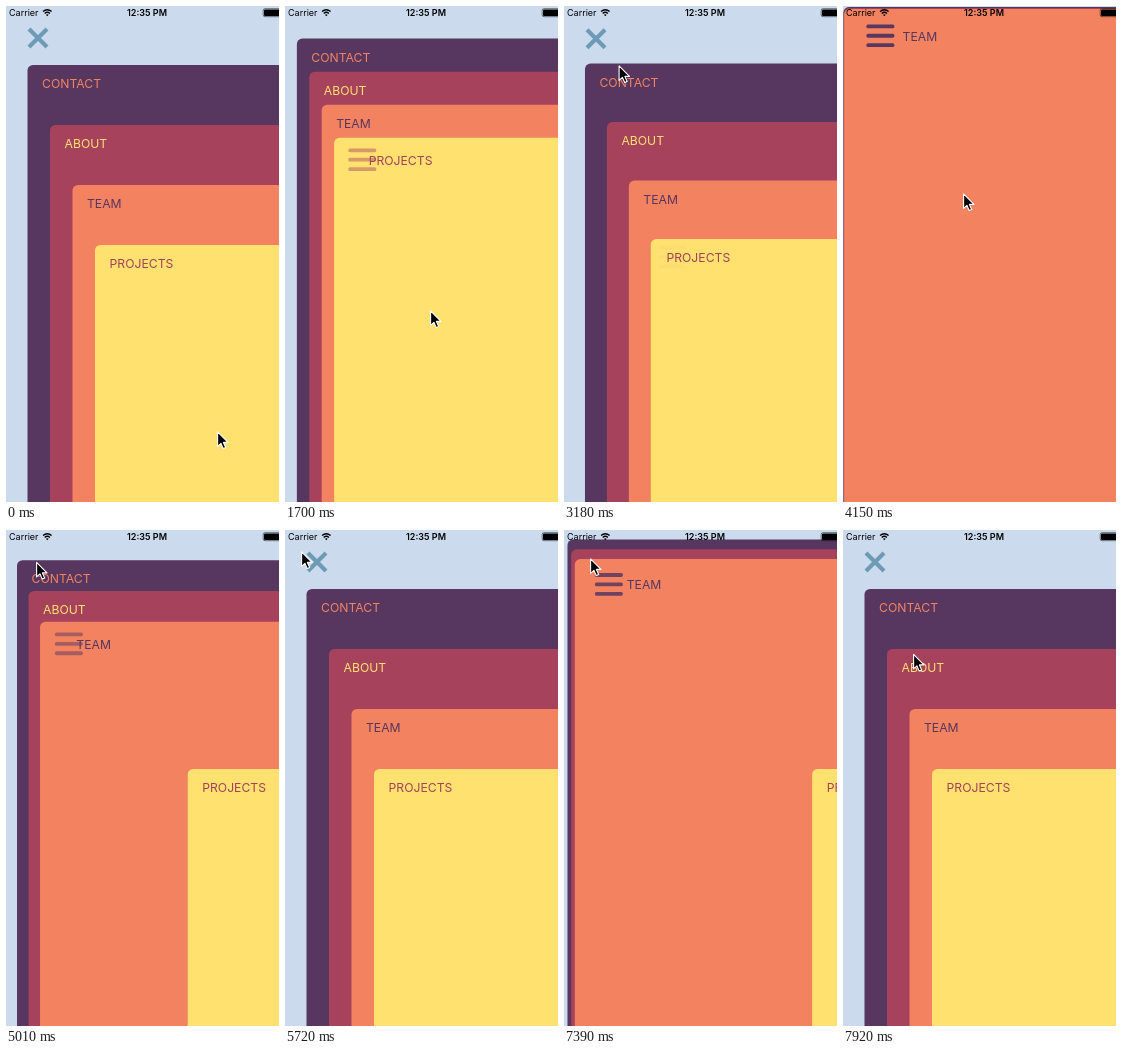
Write an HTML page that moves like this. It is 273 px wide and 496 px high and loops after 8 s.

```html
<!DOCTYPE html>
<html lang="en">
<head>
<meta charset="utf-8">
<title>Card menu</title>
<style>
  html, body { margin: 0; width: 100%; height: 100%; overflow: hidden; background: #cbdbed; }
  svg { display: block; width: 273px; height: 496px; }
  text { font-family: Inter, Roboto, "Liberation Sans", sans-serif; }
  .title { font-size: 12.2px; }
  .status { font-size: 9px; }
</style>
</head>
<body>
<svg viewBox="0 0 273 496">
  <rect width="273" height="496" fill="#cbdbed"/>
  <path id="close" d="M-9-9 9 9M9-9-9 9" stroke="#6d9ab5" stroke-width="4.2"/>
  <g id="cards"></g>
  <g class="status">
    <text x="3" y="10">Carrier</text>
    <text x="141" y="10" text-anchor="middle" font-weight="600">12:35 PM</text>
    <g fill="none" stroke="#000" stroke-width="1.3">
      <path d="M37 5.6Q41.3 1.8 45.6 5.6M38.7 7.4Q41.3 5 43.9 7.4"/>
      <path d="M41.3 10.2 39.9 8.7Q41.3 7.6 42.7 8.7Z" fill="#000" stroke="none"/>
    </g>
    <rect x="257.2" y="2.7" width="22" height="8" rx="1.8" fill="none" stroke="#000" stroke-width=".5"/>
    <rect x="258" y="3.5" width="22" height="6.4" rx="1"/>
  </g>
  <path id="cursor" d="M.6.8V15.4L3.9 12.3 6.2 17.6 8.7 16.5 6.4 11.4H11Z"
        fill="#000" stroke="#fff" stroke-width="1.1" stroke-linejoin="round"/>
</svg>
<script>
const LOOP = 8000, TICK = 87.8, LEAD = 2, SPAN = 500, GLIDE = 350, OFFSTAGE = 279;

const PURPLE = '#57365f', RED = '#a6425c', ORANGE = '#f38360', YELLOW = '#ffe170';
const CARDS = [
  ['CONTACT', PURPLE, ORANGE],
  ['ABOUT', RED, YELLOW],
  ['TEAM', ORANGE, PURPLE],
  ['PROJECTS', YELLOW, RED],
];

// taps shut and open the menu in turn: first on PROJECTS, then on TEAM
const TAPS = [1436, 2707, 3665, 4753, 6296, 7250];

// pointer stops: [arrival, x, y]
const STOPS = [
  [0, 211, 425], [177, 152, 344], [880, 145, 304], [2285, 39, 37],
  [2460, 27, 31], [3163, 54.5, 59], [3426, 120, 187], [4568, 30, 31.5],
  [5621, 16, 21], [6060, 26, 28], [7904, 70, 123.5],
];

const $ = id => document.getElementById(id);
const mix = (a, b, k) => a + (b - a) * k;
const place = (el, x, y) => el.setAttribute('transform', `translate(${x.toFixed(2)} ${y.toFixed(2)})`);

function add(parent, tag, attrs, text = '') {
  const el = document.createElementNS('http://www.w3.org/2000/svg', tag);
  for (const key in attrs) el.setAttribute(key, attrs[key]);
  el.textContent = text;
  return parent.appendChild(el);
}

const cards = CARDS.map(([name, fill, ink], i) => {
  const box = add($('cards'), 'g', {});
  add(box, 'rect', { width: 400, height: 600, rx: 5.5, fill });
  const burger = add(box, 'g', { fill: ink });
  for (let n = 0; n < 3; n++) add(burger, 'rect', { y: 9.4 * n, width: 28, height: 3.8, rx: 1.6 });
  const title = add(box, 'text', { class: 'title', fill: ink }, name);
  return { box, burger, title, x: 22.5 * (i + 1) - 1, y: 60 * (i + 1) - 1 };
});

// cubic-bezier(.42, 0, 1, 1), solved by bisection
function easeIn(x) {
  let lo = 0, hi = 1, s = 0.5;
  for (let i = 0; i < 24; i++) {
    s = (lo + hi) / 2;
    const at = 1.26 * s * (1 - s) ** 2 + 3 * s * s * (1 - s) + s ** 3;
    if (at < x) lo = s; else hi = s;
  }
  return s * s * (3 - 2 * s);
}

function easeInOut(x) {
  if (x <= 0) return 0;
  if (x >= 1) return 1;
  return x < 0.5 ? easeIn(2 * x) / 2 : 1 - easeIn(2 - 2 * x) / 2;
}

function menuAt(t) {
  const count = TAPS.filter(tap => tap <= t).length;
  const k = count ? easeInOut((t - TAPS[count - 1]) / SPAN) : 1;
  return { open: count % 2 ? 1 - k : k, chosen: count < 3 ? 3 : 2 };
}

// rests at each stop, then glides so as to arrive at the next on time
function pointerAt(t) {
  const n = STOPS.findIndex(stop => stop[0] > t);
  if (n < 0) return STOPS[STOPS.length - 1].slice(1);
  const [t0, x0, y0] = STOPS[n - 1], [t1, x1, y1] = STOPS[n];
  const start = Math.max(t0, t1 - GLIDE);
  const k = Math.max(0, (t - start) / (t1 - start));
  return [mix(x0, x1, k), mix(y0, y1, k)];
}

function draw(time) {
  // the picture advances in even ticks
  const t = Math.max(0, LEAD + TICK * Math.floor((time - LEAD) / TICK));
  const { open, chosen } = menuAt(t);
  const shut = 1 - open;

  cards.forEach((card, i) => {
    const k = i === chosen ? shut : 0;
    if (i > chosen) place(card.box, mix(card.x, OFFSTAGE, shut), card.y);
    else place(card.box, card.x * open, card.y * open);
    place(card.title, mix(14.5, 59.2, k), mix(23, 31.6, k));
    place(card.burger, mix(7.5, 22.5, k), mix(6.5, 15.5, k));
    card.burger.setAttribute('opacity', k);
  });

  place($('close'), 32, 32 + 33 * shut);
  place($('cursor'), ...pointerAt(t));
}

const begin = performance.now();
function frame() {
  draw((performance.now() - begin) % LOOP);
  requestAnimationFrame(frame);
}
frame();
</script>
</body>
</html>
```
